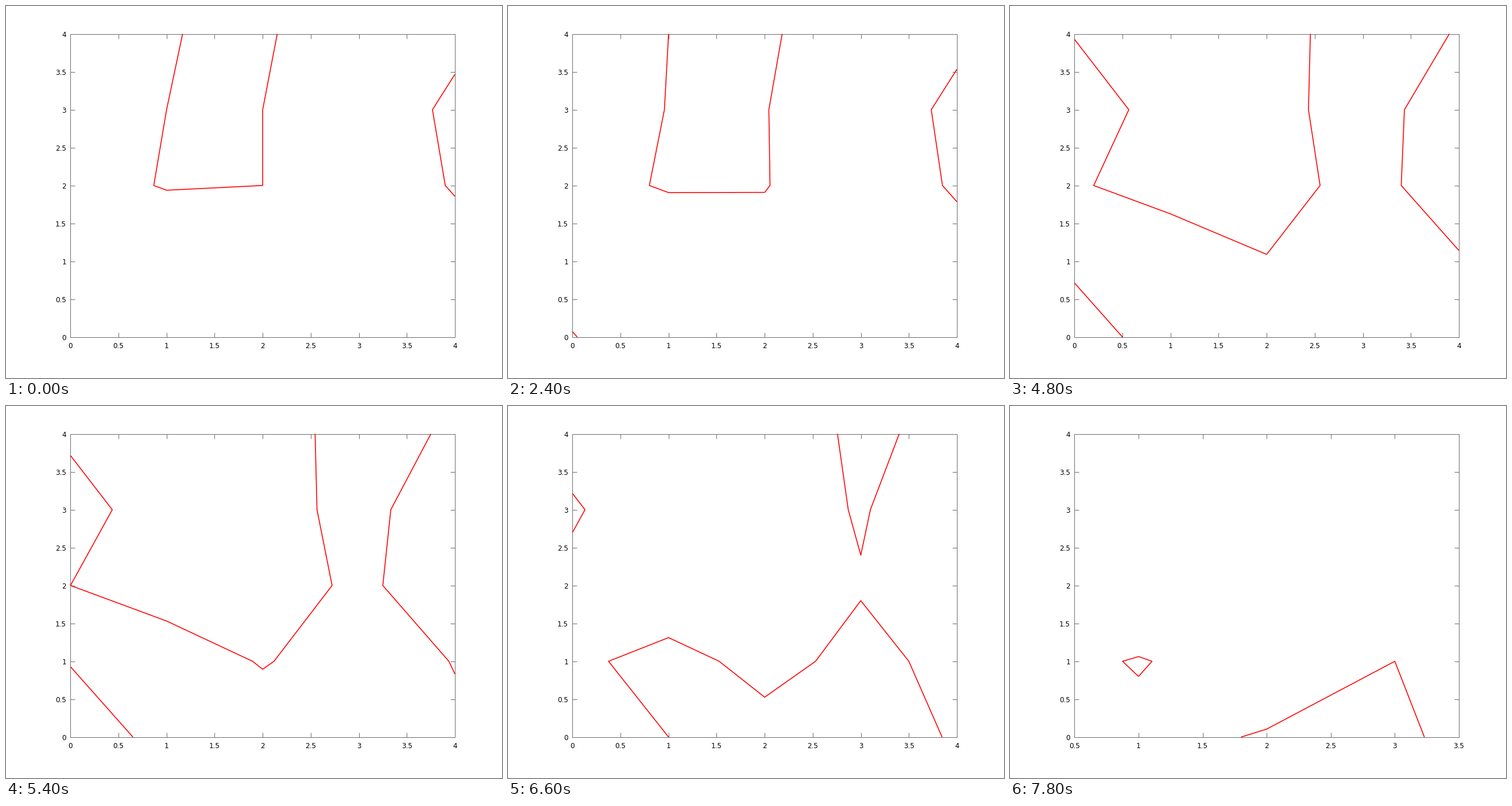
Animation, 864 px wide and 648 px high, one loop 8.4 s. Source, as a matplotlib script:

```python
import numpy as np
import matplotlib.pyplot as plt
from matplotlib.animation import FuncAnimation

plt.rcParams["font.family"] = "DejaVu Sans"

# Heights on a 5 x 5 grid, row by row from y = 0 to y = 4
HEIGHT = np.array([
    [0, 20, 30, 31, 18],
    [14, 30, 11, 28, 12],
    [13, -2, 0, 18, -2],
    [23, 0, 0, 23, -7],
    [9, 1, -5, 28, 8],
], float)
LEVELS = [0, 0.1, 0.2, 0.5, 1, 2, 3, 8, 10, 13, 16, 20, 22, 28]
GREY = "0.42"

# At 72 dpi one point is one pixel
fig = plt.figure(figsize=(12, 9), dpi=72, facecolor="white")
ax = fig.add_axes([0.13, 0.11, 0.775, 0.815])
for spine in ax.spines.values():
    spine.set(linewidth=1, edgecolor=GREY)
ax.tick_params(direction="in", top=True, right=True, length=8, width=1,
               color=GREY, labelcolor="black", labelsize=12)
ax.tick_params(axis="x", pad=9.3)
ax.tick_params(axis="y", pad=7.3)

grid = np.arange(5)
lines = None


def set_axes(x0, x1):
    xt = np.arange(x0, x1 + 0.1, 0.5)
    yt = np.arange(0, 4.1, 0.5)
    ax.set_xticks(xt, [f"{v:g}" for v in xt])
    ax.set_yticks(yt, [f"{v:g}" for v in yt])
    ax.set_xlim(x0, x1)
    ax.set_ylim(0, 4)


def draw(i):
    global lines
    if lines is not None:
        lines.remove()
    level = LEVELS[i]
    lines = ax.contour(grid, grid, HEIGHT, levels=[level], colors="red",
                       linewidths=1.6, zorder=5)
    lines.set_clip_on(False)
    # The axis tightens once the curve leaves the outer half cells
    if level > 23:
        set_axes(0.5, 3.5)
    else:
        set_axes(0, 4)
    return [lines]


anim = FuncAnimation(fig, draw, frames=len(LEVELS), interval=600,
                     repeat=True, repeat_delay=0, blit=False)
plt.show()
```
